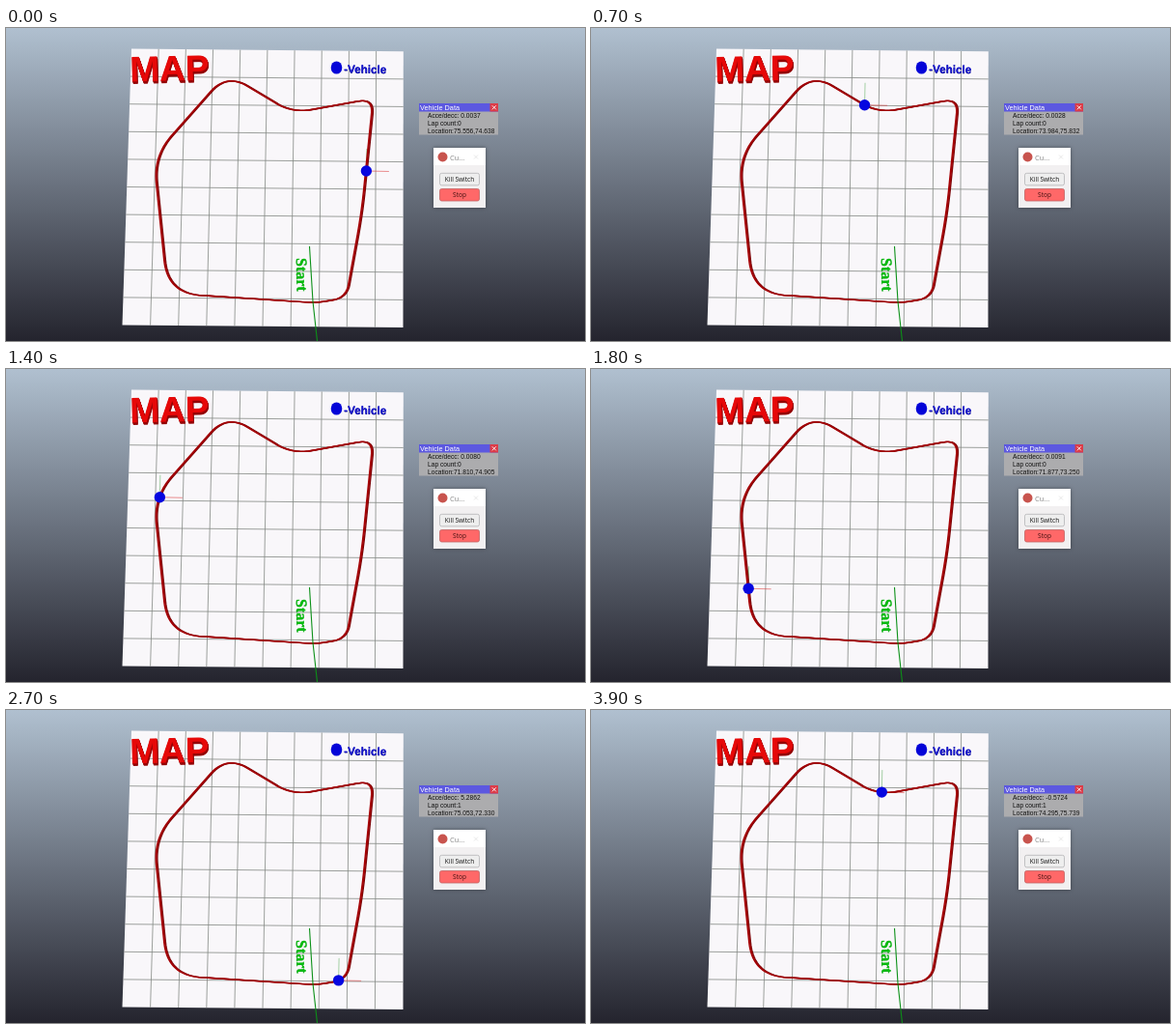
Animation of 600 by 324 pixels, one loop 4 s. Source, as an HTML page with a canvas:

```html
<!DOCTYPE html>
<html>
<head>
<meta charset="utf-8">
<style>
html, body { margin: 0; width: 100%; height: 100%; overflow: hidden; background: #24242e; }
canvas { display: block; }
</style>
</head>
<body>
<canvas id="stage" width="600" height="324"></canvas>
<script>
const ctx = document.getElementById('stage').getContext('2d');
const LOOP = 4000, STEP = 100, NEW_LAP = 2600;
const SANS = '"Liberation Sans", Arial, sans-serif';
const UI = '"Open Sans", "Noto Sans", sans-serif';

// The track is a polygon with rounded corners: x, y, length cut off each side
const CORNERS = [
  [381, 73, 16], [297, 88, 20], [229, 47.3, 25], [153.5, 132.5, 28],
  [168, 274.5, 34], [322, 284.5, 10], [353, 279, 14], [369, 191, 25]
];
const START = { x: 373.5, y: 148 };
const CURVE_STEPS = 24;

const lerp = (a, b, u) => a + (b - a) * u;
const mix = (p, q, u) => [lerp(p[0], q[0], u), lerp(p[1], q[1], u)];
const gap = (p, q) => Math.hypot(q[0] - p[0], q[1] - p[1]);

function roundedPath(corners) {
  const n = corners.length;
  const points = corners.flatMap((corner, i) => {
    const toward = other => mix(corner, other, corner[2] / gap(corner, other));
    const from = toward(corners[(i + n - 1) % n]);
    const to = toward(corners[(i + 1) % n]);
    return Array.from({ length: CURVE_STEPS + 1 }, (_, s) => {
      const u = s / CURVE_STEPS;
      return mix(mix(from, corner, u), mix(corner, to, u), u);
    });
  });
  return [...points, points[0]];
}

const track = roundedPath(CORNERS);
const lengths = [0];
for (let i = 1; i < track.length; i++) {
  lengths.push(lengths[i - 1] + gap(track[i - 1], track[i]));
}
const total = lengths[lengths.length - 1];
const startOffset = total - gap([START.x, START.y], track[0]);
const speed = (total + 29) / 3400;

function pointAt(distance) {
  const d = distance % total;
  let i = 1;
  while (lengths[i] < d) i++;
  return mix(track[i - 1], track[i], (d - lengths[i - 1]) / (lengths[i] - lengths[i - 1]));
}

const pulse = (time, peak) => Math.exp(-(((time - peak) / 50) ** 2));

function acceleration(time) {
  const drift = 0.0092 * Math.abs(Math.sin(Math.PI * (time - 400) / 3000));
  return drift + 5.28 * pulse(time, 2700) - 0.577 * pulse(time, 3900);
}

function stateAt(time) {
  const [x, y] = pointAt(startOffset + speed * time);
  return {
    x, y,
    acc: acceleration(time),
    lap: time >= NEW_LAP ? 1 : 0,
    wx: 75.558 + (x - START.x) * 0.0175,
    wy: 74.638 - (y - START.y) * 0.0175
  };
}

function line(color, width, ...points) {
  ctx.strokeStyle = color;
  ctx.lineWidth = width;
  ctx.beginPath();
  points.forEach(([x, y]) => ctx.lineTo(x, y));
  ctx.stroke();
}

function box(color, x, y, w, h) {
  ctx.fillStyle = color;
  ctx.fillRect(x, y, w, h);
}

function disc(color, x, y, rx, ry = rx) {
  ctx.fillStyle = color;
  ctx.beginPath();
  ctx.ellipse(x, y, rx, ry, 0, 0, 2 * Math.PI);
  ctx.fill();
}

function text(str, x, y, font, color, align = 'left') {
  ctx.font = font;
  ctx.fillStyle = color;
  ctx.textAlign = align;
  ctx.fillText(str, x, y);
}

function solidText(str, x, y, font, face, side, depth, angle) {
  ctx.save();
  ctx.translate(x, y);
  ctx.rotate(angle);
  for (let d = depth; d > 0; d -= 0.5) text(str, d * 0.4, d, font, side);
  text(str, 0, 0, font, face);
  ctx.restore();
}

function cross(x, y, r, color) {
  line(color, 0.9, [x - r, y - r], [x + r, y + r]);
  line(color, 0.9, [x - r, y + r], [x + r, y - r]);
}

function button(label, y, fill, border, color) {
  ctx.fillStyle = fill;
  ctx.strokeStyle = border;
  ctx.lineWidth = 0.8;
  ctx.beginPath();
  ctx.roundRect(449.5, y, 41, 12.5, 2);
  ctx.fill();
  ctx.stroke();
  text(label, 470, y + 8.7, '6.5px ' + UI, color, 'center');
}

function drawSky() {
  const sky = ctx.createLinearGradient(0, 0, 0, 324);
  sky.addColorStop(0, '#b0c0d0');
  sky.addColorStop(1, '#24242e');
  box(sky, 0, 0, 600, 324);
}

const onBoard = (u, v) => mix(
  mix([130, 21.5], [411.8, 24.3], u),
  mix([120.5, 307.5], [411.5, 310], u), v);

function drawBoard() {
  ctx.fillStyle = '#f9f7fa';
  ctx.beginPath();
  [[0, 0], [1, 0], [1, 1], [0, 1]].forEach(([u, v]) => ctx.lineTo(...onBoard(u, v)));
  ctx.fill();
  for (let i = 1; i < 10; i++) {
    line('#858a85', 0.8, onBoard(i / 10, 0), onBoard(i / 10, 1));
    line('#858a85', 0.8, onBoard(0, i / 10), onBoard(1, i / 10));
  }
}

function drawTrack() {
  ctx.lineJoin = 'round';
  // Upright stretches look wider than level ones
  for (const [dx, color] of [[0.9, '#780004'], [-0.8, '#a80408'], [0, '#a00206']]) {
    line(color, 1.4, ...track.map(([x, y]) => [x + dx, y]));
  }
}

function drawLabels() {
  line('#0c9018', 1.1, [314.5, 226], [318, 283], [322.5, 324]);
  solidText('MAP', 128.5, 55.5, 'bold 37px ' + SANS, '#e60808', '#940406', 2.5, -0.022);
  disc('#0404d8', 342.5, 41, 5.8, 6.6);
  solidText('-Vehicle', 350, 46.3, 'bold 11.7px ' + SANS, '#1414d0', '#080878', 0.5, 0.012);
  solidText('Start', 301, 238, 'bold 16px "Liberation Serif", serif',
    '#08bc10', '#10a018', 0.5, 1.545);
}

function drawVehicle({ x, y }) {
  disc('#0606e0', x, y, 5.7);
}

function drawAxes({ x, y }) {
  line('rgba(220,50,50,.6)', 0.9, [x, y], [x + 23.5, y + 0.5]);
  line('rgba(60,160,60,.5)', 0.9, [x, y], [x + 0.5, y - 23]);
}

function drawPanel({ acc, lap, wx, wy }) {
  box('#acacae', 428, 78, 82, 32.5);
  box('#5c58e0', 428, 78, 82, 8.5);
  text('Vehicle Data', 429, 85, '7.3px ' + SANS, '#fff');
  box('#dc3c48', 501.5, 78, 8.5, 8.5);
  cross(505.8, 82.3, 2, '#fff');
  const rows = [
    'Acce/decc: ' + acc.toFixed(4),
    'Lap count:' + lap,
    `Location:${wx.toFixed(3)},${wy.toFixed(3)}`
  ];
  rows.forEach((row, i) => text(row, 437, 92.5 + 8 * i, '6.65px ' + SANS, '#101010'));
}

function drawWindow() {
  ctx.save();
  ctx.shadowColor = 'rgba(0,0,0,.4)';
  ctx.shadowBlur = 4;
  box('#f2f0f1', 443, 124, 54, 62);
  ctx.restore();
  box('#fff', 443, 124, 54, 18);
  disc('#c8544e', 452.5, 133.5, 5);
  text('Cu...', 460, 136.8, '7.5px ' + UI, '#888');
  cross(487, 133.5, 2, '#e4e4e4');
  button('Kill Switch', 150.3, '#eeeeee', '#b4b4b6', '#101010');
  button('Stop', 166.5, '#ff6868', '#c06464', '#401010');
}

function draw(time) {
  const state = stateAt(time);
  drawSky();
  drawBoard();
  drawAxes(state);
  drawTrack();
  drawLabels();
  drawVehicle(state);
  drawPanel(state);
  drawWindow();
}

function tick() {
  const time = performance.now() % LOOP;
  draw(Math.floor(time / STEP) * STEP);
  requestAnimationFrame(tick);
}
tick();
</script>
</body>
</html>
```
